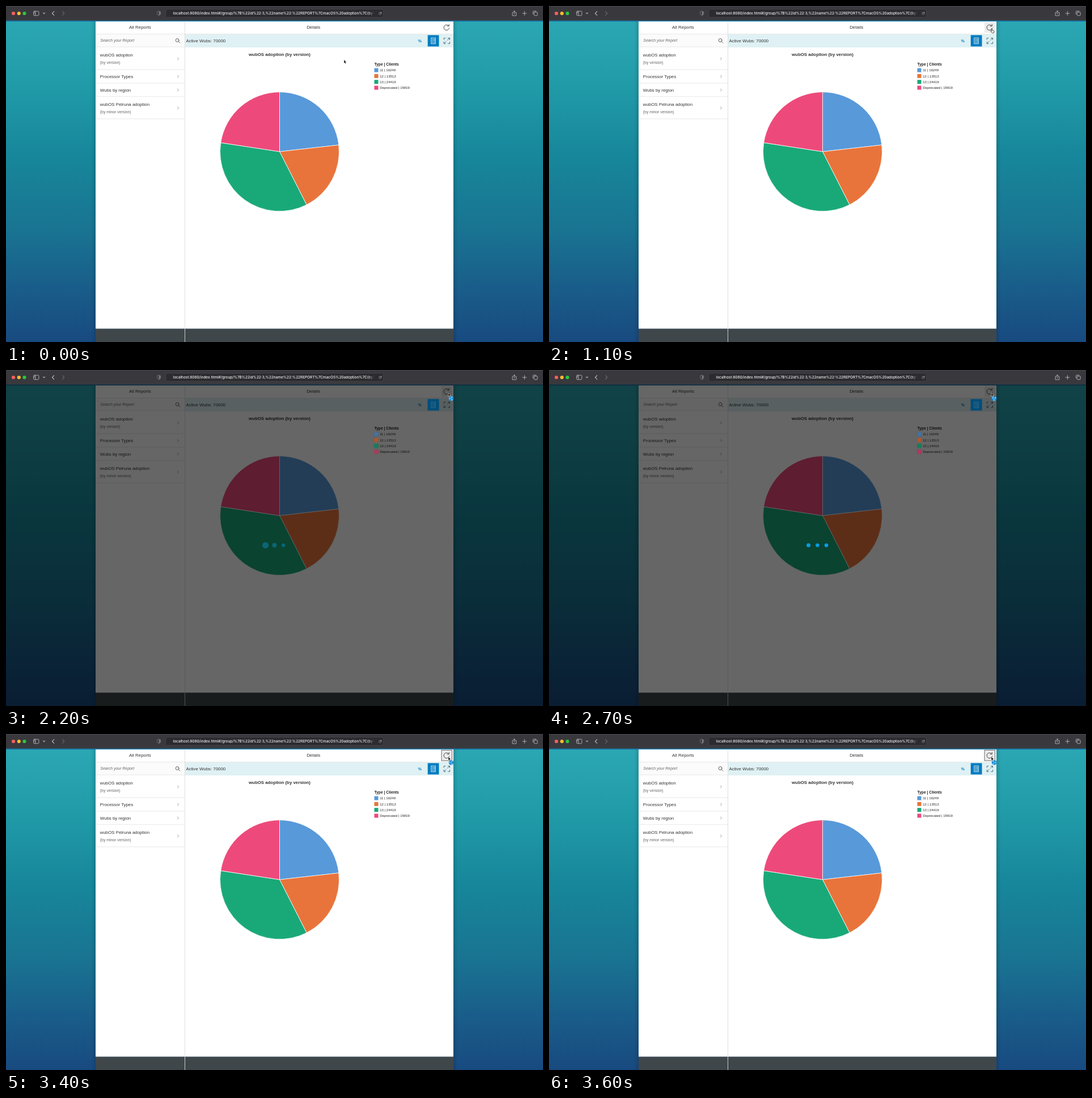
Write an HTML page that moves like this. It is 947x592 px and loops after 3700 ms.

```html
<!DOCTYPE html>
<html lang="en">
<head>
<meta charset="utf-8">
<title>Report dashboard</title>
<style>
  html, body { margin: 0; width: 100%; height: 100%; overflow: hidden; background: #fff; }
  svg { display: block; width: 947px; height: 592px; }
  text { font-family: "Liberation Sans", Arial, sans-serif; white-space: pre; }
  .line { fill: none; stroke-linecap: round; stroke-linejoin: round; }
</style>
</head>
<body>
<svg id="stage" viewBox="0 0 947 592" xmlns="http://www.w3.org/2000/svg">
  <defs>
    <linearGradient id="sea" x1="0" y1="0" x2="0" y2="1">
      <stop offset="0" stop-color="#2ba7b3"/>
      <stop offset=".2" stop-color="#219ba8"/>
      <stop offset=".42" stop-color="#17879b"/>
      <stop offset=".65" stop-color="#197492"/>
      <stop offset=".85" stop-color="#195b89"/>
      <stop offset="1" stop-color="#184a80"/>
    </linearGradient>
    <linearGradient id="shadow">
      <stop offset="0" stop-opacity="0"/>
      <stop offset="1" stop-opacity=".13"/>
    </linearGradient>
    <linearGradient id="fade" gradientUnits="userSpaceOnUse" x1="638" y1="0" x2="650" y2="0">
      <stop offset="0" stop-color="#f2f2f3"/>
      <stop offset="1" stop-color="#f2f2f3" stop-opacity="0"/>
    </linearGradient>
    <clipPath id="addressClip"><rect x="285" y="5" width="365" height="16"/></clipPath>
  </defs>

  <rect y="25" width="947" height="567" fill="url(#sea)"/>
  <rect x="150" y="27" width="8" height="565" fill="url(#shadow)"/>
  <rect x="150" y="27" width="8" height="565" fill="url(#shadow)" transform="matrix(-1 0 0 1 947 0)"/>
  <rect y="25.6" width="947" height="1.6" fill="#1268a6"/>

  <rect x="158" y="27.2" width="631" height="541.5" fill="#fff"/>
  <rect x="158" y="568.7" width="631" height="23.3" fill="#3f474a"/>
  <rect x="158" y="50" width="157" height="22" fill="#fbfbfb"/>
  <rect x="316" y="49.5" width="473" height="23.5" fill="#dff1f4"/>
  <g id="rules" stroke="#e2e2e2" stroke-width=".8"></g>
  <path d="M315.5 27.2V592" stroke="#d9dcdd" stroke-width=".9"/>
  <g id="page"></g>

  <g class="line" stroke="#4d4d4d" stroke-width=".9">
    <circle cx="302.1" cy="60.4" r="2.9"/><path d="M304.3 62.6l2.5 2.5"/>
  </g>
  <g class="line" stroke="#3f6472" stroke-width=".9">
    <path d="M775 56.5h-2.8v2.8M779.6 56.5h2.9v2.8M772.2 63.3v2.9h2.8M782.5 63.3v2.9h-2.9"/>
    <path d="M778.5 60.2l3.7-3.4M776.2 62.6l-3.7 3.3"/>
  </g>
  <rect x="743.7" y="51.3" width="19.8" height="20" fill="#007cc0"/>
  <g id="listIcon" fill="#fff"></g>

  <rect id="refreshBox" x="768" y="28.5" width="18.4" height="18.5"/>
  <g id="refreshIcon" class="line" stroke-width="1">
    <path d="M780.4 34.6A4.8 4.8 0 1 0 781.6 39"/><path d="M781.3 32.4v3h-3.2"/>
  </g>

  <g id="busy">
    <rect y="25" width="947" height="567" fill-opacity=".6"/>
    <rect x="743.7" y="51.3" width="19.8" height="20" fill="#007cc0" opacity=".4"/>
    <g id="dimKeys" opacity=".6"></g>
    <g id="dots" fill="#0a9be0"></g>
  </g>

  <rect width="947" height="25.6" fill="#39393d"/>
  <rect width="947" height=".7" fill="#505460"/>
  <circle cx="13" cy="13" r="3.1" fill="#ff5f57"/>
  <circle cx="22.8" cy="13" r="3.1" fill="#febc2e"/>
  <circle cx="32.5" cy="13" r="3.1" fill="#28c840"/>
  <rect x="281.5" y="5.7" width="384" height="14.4" rx="3.2" fill="#2c2c30" stroke="#4b4b50" stroke-width=".7"/>
  <g class="line" stroke="#b9b9bd" stroke-width=".9">
    <rect x="48.6" y="9.2" width="9.3" height="7.6" rx="1.4"/>
    <path d="M51.9 9.4v7.2M49.8 11h.8M49.8 12.5h.8"/>
    <path d="M65.6 12.2l1.5 1.5 1.5-1.5M84.7 9.6l-3.2 3.4 3.2 3.4" stroke-width="1.1"/>
    <path d="M99.5 9.6l3.2 3.4-3.2 3.4" stroke="#68686d" stroke-width="1.1"/>
    <path d="M661.8 12.2a2.1 2.1 0 1 0 .1 1.6M662 10.8v1.6h-1.5" stroke-width=".7"/>
    <path d="M894.4 11.6h-1.4v5.4h6.8v-5.4h-1.4M896.4 14.2V8.6M894.6 10.2l1.8-1.8 1.8 1.8"/>
    <path d="M911 13h6.8M914.4 9.6v6.8"/>
    <rect x="931.2" y="10.8" width="6" height="6" rx="1.2"/>
    <path d="M929.6 14.4h-.2v-4.2q0-1.2 1.2-1.2h4.2"/>
  </g>
  <path d="M269.6 9.2l3 1v3q0 2.6-3 3.8q-3-1.2-3-3.8v-3z" class="line" stroke="#77777c" stroke-width=".8"/>
  <path d="M269.6 9.2l3 1v3q0 2.6-3 3.8z" fill="#77777c"/>
  <text x="294.6" y="15.3" clip-path="url(#addressClip)" fill="url(#fade)" font-size="6.4" font-weight="500" style="font-family:Inter,sans-serif">localhost:8080/index.html#/group/%7B%22id%22:3,%22name%22:%22REPORT%7CmacOS%20adoption%7C(by%20version)</text>

  <g id="ball">
    <circle r="4.3" fill="#1b86d2"/>
    <g id="ballSpin" fill="#62c0f3">
      <path d="M0 0L0-4A4 4 0 0 1 3.5-2z"/>
      <path d="M0 0L0-4A4 4 0 0 1 3.5-2z" transform="rotate(120)"/>
      <path d="M0 0L0-4A4 4 0 0 1 3.5-2z" transform="rotate(240)"/>
    </g>
  </g>
  <path id="arrow" d="M0 0V6.6L1.5 5.2 2.5 7.6 3.6 7.1 2.6 4.8H4.6Z" fill="#111" stroke="#fff" stroke-width=".5"/>
  <path id="hand" d="M0 .5Q.7-.3 1.3.5L1.6 3 4.4 3.6Q5.2 3.9 5 4.8L4.4 7.6H1.2L-.9 5Q-1.2 4.2-.4 4.1L.4 4.6Z" fill="#fff" stroke="#111" stroke-width=".7"/>
</svg>

<script>
const LOOP = 3700, STEP = 100;
const $ = id => document.getElementById(id);

function add(parent, tag, attrs, content) {
  const node = document.createElementNS("http://www.w3.org/2000/svg", tag);
  set(node, attrs);
  if (content) node.textContent = content;
  return parent.appendChild(node);
}
function set(node, attrs) {
  for (const key in attrs) node.setAttribute(key, attrs[key]);
}
const label = (x, y, size, content, extra) =>
  add($("page"), "text", { x, y, "font-size": size, fill: "#333", ...extra }, content);
const show = (node, on) => set(node, { visibility: on ? "visible" : "hidden" });

// Left list
const middle = { "text-anchor": "middle" };
label(236.4, 39.9, 7.9, "All Reports", middle);
label(542.2, 39.9, 7.9, "Details", middle);
label(166.3, 63.4, 6.9, "Search your Report", { "font-style": "italic", fill: "#666" });

const reports = [
  { y: 89.3, mark: 93, title: "wubOS adoption", note: "(by version)" },
  { y: 126.9, mark: 124.2, title: "Processor Types" },
  { y: 150.6, mark: 148, title: "Wubs by region" },
  { y: 176.2, mark: 179.6, title: "wubOS Pelruna adoption", note: "(by minor version)" }
];
for (const { y, mark, title, note } of reports) {
  label(165.8, y, 7.85, title);
  if (note) label(165.8, y + 12.5, 6.85, note, { fill: "#666" });
  add($("page"), "path", {
    d: `M302.5 ${mark - 2.1}l2.1 2.1-2.1 2.1`, class: "line", stroke: "#858585", "stroke-width": .8
  });
}
for (const y of [72, 112.2, 135.9, 159.4, 198.8]) add($("rules"), "path", { d: `M158 ${y}H315` });
add($("rules"), "path", { d: "M158 49.4H789" });

// Details bar and chart
label(317.5, 63.7, 7.85, "Active Wubs: 70000");
label(729.9, 63.5, 6.9, "%", { ...middle, "font-weight": "bold", fill: "#0a7cb8" });
label(482.5, 88.2, 7.85, "wubOS adoption (by version)", { ...middle, "font-weight": "bold" });
label(649.4, 104.7, 6.75, "Type | Clients", { "font-weight": "bold", fill: "#222" });

const slices = [
  ["11", 16249, "#5899da"], ["12", 13513, "#e8743b"],
  ["13", 24419, "#19a979"], ["Deprecated", 15819, "#ed4a7b"]
];
const pie = { x: 482.5, y: 256.6, r: 105 };
const total = slices.reduce((sum, slice) => sum + slice[1], 0);
const rim = part => {
  const angle = part * 2 * Math.PI;
  return `${pie.x + pie.r * Math.sin(angle)} ${pie.y - pie.r * Math.cos(angle)}`;
};
let start = 0;
slices.forEach(([name, count, fill], i) => {
  const end = start + count / total;
  add($("page"), "path", {
    d: `M${pie.x} ${pie.y}L${rim(start)}A${pie.r} ${pie.r} 0 0 1 ${rim(end)}Z`,
    fill, stroke: "#fff", "stroke-width": .8
  });
  start = end;
  const y = 109.6 + i * 10.3;
  for (const layer of [$("page"), $("dimKeys")]) {
    add(layer, "rect", { x: 649.5, y, width: 7, height: 7, fill });
  }
  label(659.2, y + 5.8, 6.02, `${name} | ${count}`, { fill: "#222" });
});

// Legend button icon
add($("listIcon"), "rect", {
  x: 749.8, y: 56.1, width: 7.8, height: 10.4, fill: "none", stroke: "#fff", "stroke-width": .8
});
for (const y of [58, 60.7, 63.4]) {
  add($("listIcon"), "rect", { x: 751.3, y, width: 1.4, height: 1.4 });
  add($("listIcon"), "rect", { x: 753.8, y, width: 2.4, height: 1.3 });
}

const dots = [457.6, 473.4, 489.1].map(cx => add($("dots"), "circle", { cx, cy: 308.8 }));

const clamp = v => Math.max(0, Math.min(1, v));
const smooth = v => v * v * (3 - 2 * v);

function pointer(t) {
  if (t < 100) return [596, 94.6];
  if (t >= 1000) return [780, 40];
  const p = smooth(clamp((t - 300) / 600));
  return [652 + 127 * p, 78 - 38 * p];
}

// Each dot swells in turn.
function dotRadius(t, i) {
  const period = 690, reach = 250;
  const phase = (((t - i * 150) % period) + period) % period;
  const away = Math.min(phase, period - phase);
  return 3.2 + (away < reach ? 1.15 * (1 + Math.cos(Math.PI * away / reach)) : 0);
}

function render(time) {
  const t = Math.floor(time / STEP) * STEP;
  const [x, y] = pointer(t);
  const hover = x > 768;
  const pressed = t >= 2000 && t < 2200;
  const waiting = t >= 2200;
  const focused = t >= 3400;
  const useHand = hover && !waiting;

  set($("refreshBox"), {
    fill: pressed ? "#007cc0" : hover ? "#ebebeb" : "none",
    stroke: focused ? "#4a4a4a" : "none", "stroke-width": .8
  });
  set($("refreshIcon"), { stroke: pressed ? "#fff" : "#4b4b4b" });

  show($("busy"), waiting && !focused);
  set($("dots"), { opacity: .4 + .6 * clamp((t - 2200) / 500) });
  dots.forEach((dot, i) => set(dot, { r: dotRadius(t - 2200, i) }));

  show($("hand"), useHand);
  show($("arrow"), !useHand);
  show($("ball"), waiting);
  set($("hand"), { transform: `translate(${x} ${y})` });
  set($("arrow"), { transform: `translate(${x} ${y})` });
  set($("ball"), { transform: "translate(785 50.2)" });
  set($("ballSpin"), { transform: `rotate(${(t - 2200) * .3})` });
}

const origin = performance.now();
function tick() {
  render((performance.now() - origin) % LOOP);
  requestAnimationFrame(tick);
}
tick();
</script>
</body>
</html>
```
